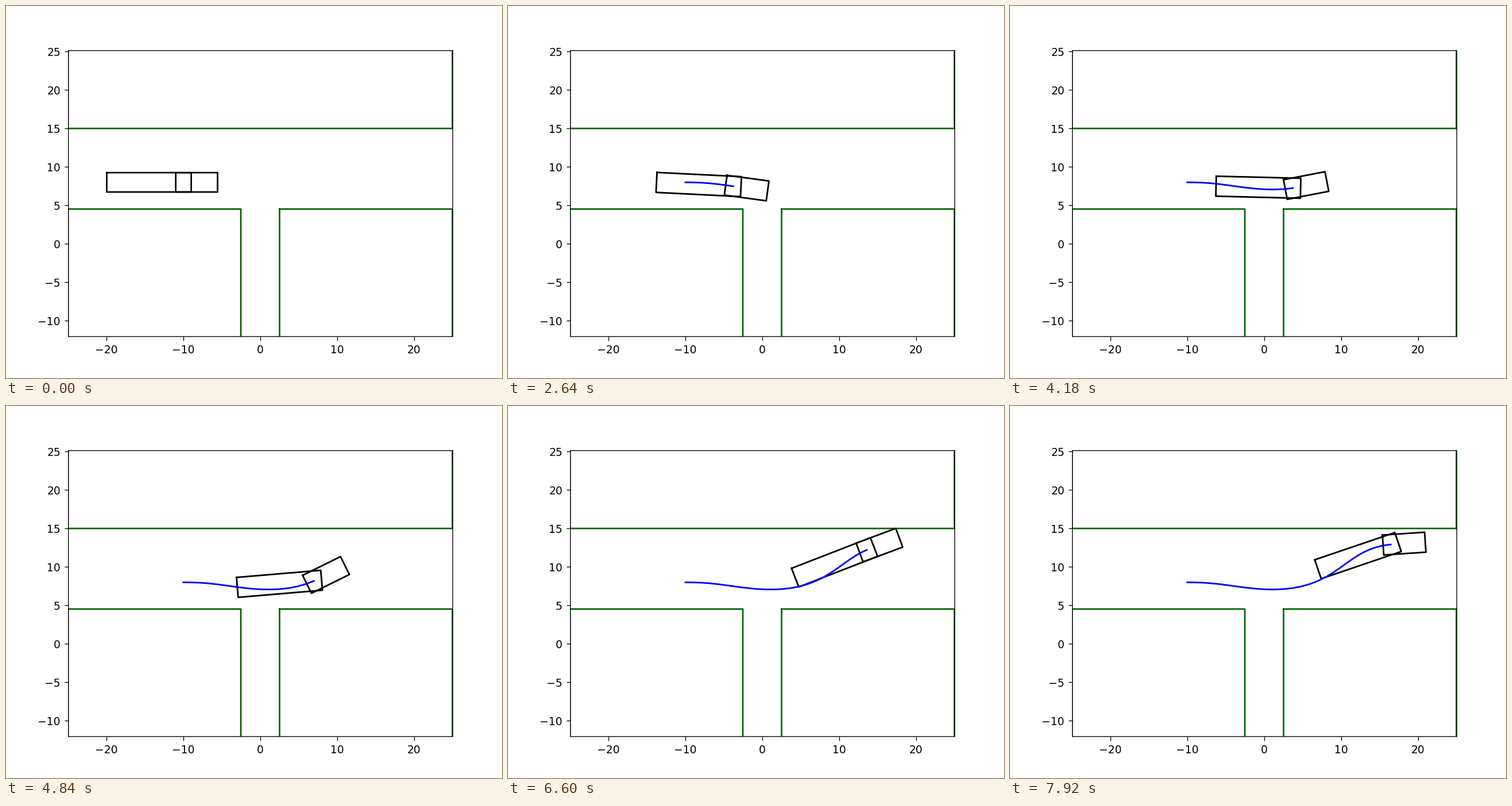
Animation of 864 by 648 pixels, one loop 8000 ms. Source, as a matplotlib script:

```python
import numpy as np
import matplotlib.pyplot as plt
from matplotlib.animation import FuncAnimation

TICK, STEP, LOOP = 20, 220, 8000      # ms
LAST = LOOP // STEP
SCALE = 9.92                          # cells of a 640 x 480 grid per unit
LEFT, BOTTOM = 80, 52.8               # grid place of the corner (X0, Y0)
X0, Y0 = -25, -12.129
LINE, FRAME = 1.44, 0.72              # pt, two cells and one cell of the grid
WIDTH = 2.6
TRACTOR = (-1.0, 4.5)                 # rear and front, measured from the hitch
TRAILER = (-10.0, 1.0)
TRAILER_BASE = 8.4


def snap(x, y):
    """Move points to the nearest grid lines."""
    gx = np.floor(LEFT + (np.asarray(x) - X0) * SCALE + 0.5)
    gy = np.floor(BOTTOM + (np.asarray(y) - Y0) * SCALE + 0.5)
    return X0 + (gx - LEFT) / SCALE, Y0 + (gy - BOTTOM) / SCALE


def bell(k, height, middle, width):
    return height * np.exp(-((k - middle) / width) ** 2)


def heading(k):
    """Tractor heading: a slight right turn, a strong left turn, a soft end."""
    return np.radians(bell(k, -8.1, 11.4, 5.2) + bell(k, 35.8, 25.3, 6)
                      + bell(k, 3, 34, 4))


def travelled(k):
    """Distance driven: speeds up from rest, then slows down."""
    return k * (k - 1) / 2 * (0.1187 - 0.00193 * k - 3.8e-6 * k * k)


def simulate():
    k = np.arange(LAST + 1)
    head = np.where(k > 1, heading(k), 0)
    tail = np.zeros(LAST + 1)
    hitch = np.zeros((LAST + 1, 2))
    hitch[0] = -10, 8
    for i, d in enumerate(np.diff(travelled(k))):
        hitch[i + 1] = hitch[i] + d * np.array([np.cos(head[i]), np.sin(head[i])])
        tail[i + 1] = tail[i] + d * np.sin(head[i] - tail[i]) / TRAILER_BASE
    return hitch, head, tail


def box(x0, x1, y0, y1):
    return np.array([x0, x1, x1, x0, x0]), np.array([y1, y1, y0, y0, y1])


def place(line, span, pos, angle):
    x, y = box(*span, -WIDTH / 2, WIDTH / 2)
    c, s = np.cos(angle), np.sin(angle)
    px, py = pos[0] + x * c - y * s, pos[1] + x * s + y * c
    level = angle == 0
    line.set_data(*(snap(px, py) if level else (px, py)))
    line.set_linewidth(LINE if level else 1.5)


hitch, head, tail = simulate()

plt.rcParams.update({"path.snap": False, "axes.linewidth": FRAME,
                     "xtick.major.width": FRAME, "ytick.major.width": FRAME,
                     "xtick.major.pad": 4.0, "ytick.major.pad": 3.86})
fig = plt.figure(figsize=(6.4, 4.8), dpi=135)

# the frame runs through the middle of grid cells
x0, x1, y0, y1 = 80.5, 576.5, 53.5, 422.5
ax = fig.add_axes([x0 / 640, y0 / 480, (x1 - x0) / 640, (y1 - y0) / 480])
ax.set_xlim(X0 + (x0 - LEFT) / SCALE, X0 + (x1 - LEFT) / SCALE)
ax.set_ylim(Y0 + (y0 - BOTTOM) / SCALE, Y0 + (y1 - BOTTOM) / SCALE)
ax.set_xticks(range(-20, 21, 10))
ax.set_yticks(range(-10, 26, 5))

for wall in [(-25, 25, 15, 30), (-25, -2.5, -20, 4.5), (2.5, 25, -20, 4.5)]:
    ax.plot(*snap(*box(*wall)), color="darkgreen", lw=LINE)

trailer, = ax.plot([], [], "k")
tractor, = ax.plot([], [], "k")
trace, = ax.plot([], [], "b", lw=1.5)


def update(frame):
    k = min(frame * TICK // STEP, LAST)
    place(trailer, TRAILER, hitch[k], tail[k])
    place(tractor, TRACTOR, hitch[k], head[k])
    shown = k + 1 if k > 1 else 0
    trace.set_data(hitch[:shown, 0], hitch[:shown, 1])
    return trailer, tractor, trace


anim = FuncAnimation(fig, update, frames=LOOP // TICK, interval=TICK,
                     init_func=lambda: update(0), repeat=True, repeat_delay=0)
plt.show()
```
